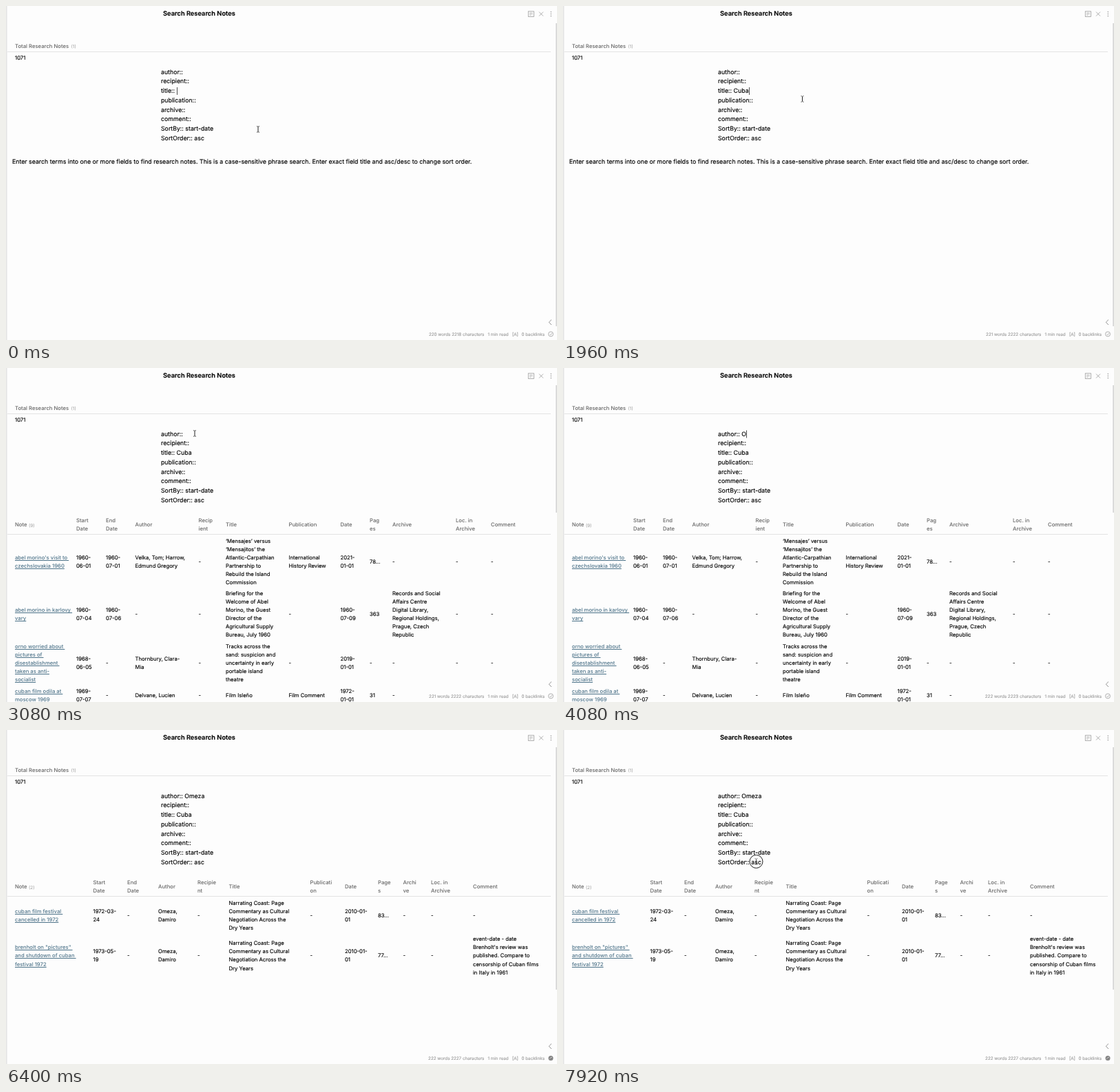
An HTML page with a canvas that plays this animation: 800x485 px, repeating every 8 s.

```html
<!DOCTYPE html>
<html lang="en">
<head>
<meta charset="utf-8">
<title>Search Research Notes</title>
<style>
html, body { margin: 0; width: 100%; height: 100%; overflow: hidden; background: #fdfdfd; }
#stage { position: relative; width: 800px; height: 485px; overflow: hidden;
  font-family: Inter, Roboto, sans-serif; text-rendering: geometricPrecision;
  -webkit-text-stroke: 0.14px; color: #000; }
canvas { position: absolute; left: 0; top: 0; width: 800px; height: 485px; }
.t { position: absolute; white-space: pre; font-size: 7.7px; line-height: 12.05px; }
.title { font-size: 9.3px; font-weight: 600; }
.body { font-size: 8.77px; line-height: 13.75px; }
.head { color: #646464; font-weight: 500; -webkit-text-stroke: 0; }
.count { color: #9a9a9a; font-size: 6.4px; -webkit-text-stroke: 0; }
.status { color: #9b9b9b; font-size: 6.25px; }
.link { color: #4d7389; font-weight: 500; -webkit-text-stroke: 0;
  text-decoration: underline; text-decoration-thickness: 0.7px; }
</style>
</head>
<body>
<div id="stage"></div>
<script>
const LOOP = 8000;
const stage = document.getElementById('stage');

function layer() {
  return stage.appendChild(document.createElement('div'));
}

// Places text with its block of lines centred on y; the drop allows for the font's low line box.
const DROP = 0.9;
function put(parent, x, y, text, cls = '') {
  const el = document.createElement('div');
  el.className = 't ' + cls;
  el.textContent = text;
  parent.append(el);
  const pitch = cls === 'body' ? 13.75 : 12.05;
  el.style.left = x + 'px';
  el.style.top = y + DROP - text.split('\n').length * pitch / 2 + 'px';
  return el;
}

const base = layer(), hint = layer(), dates = layer(), full = layer(), narrow = layer();

put(base, 228, 11.6, 'Search Research Notes', 'title');
put(base, 13, 58.3, 'Total Research Notes', 'head');
put(base, 94.5, 58.5, '(1)', 'count');
put(base, 13, 75.5, '1071');
const fields = ['author:: ', 'recipient::', 'title:: ', 'publication::', 'archive::', 'comment::',
  'SortBy:: start-date', 'SortOrder:: asc'].map((s, i) => put(base, 225, 96.6 + 13.75 * i, s, 'body'));
const counter = put(base, 0, 476.5, '', 'status');
counter.style.left = 'auto';
counter.style.right = '105.6px';
put(base, 699.5, 476.5, '1 min read', 'status');
put(base, 735, 476.5, '[A]', 'status');
put(base, 748.5, 476.5, '0 backlinks', 'status');

put(hint, 9, 227, 'Enter search terms into one or more fields to find research notes. This is a ' +
  'case-sensitive phrase search. Enter exact field title and asc/desc to change sort order.', 'body');

put(dates, 15, 222, '(9)', 'count');
[
  ['1960-06-01', '1960-07-01', '2021-01-01'],
  ['1960-07-04', '1960-07-06', '1960-07-09', '363'],
  ['1968-06-05', '', '2019-01-01'],
  ['1969-07-07', '', '1972-01-01', '31'],
  ['1972-03-24', '', '1972-01-01', '80'],
  ['1972-03-24', '', '2010-01-01'],
  ['1972-03-24', '', '1972-03-24'],
  ['1972-05-04', '', '1972-05-04'],
  ['1973-05-19', '', '2010-01-01']
].forEach((row, i) => row.forEach((s, c) => put(dates, [84, 211, 494, 620][c], 238.7 + 16.6 * i, s)));

function table(parent, cols, heads, count, rows) {
  heads.forEach((s, c) => put(parent, cols[c], 227.5, s, 'head'));
  put(parent, 33, 227.8, count, 'count');
  for (const [y, ...cells] of rows)
    cells.forEach((s, c) => put(parent, cols[c], y, s, c ? '' : 'link'));
}

table(full, [13, 102, 145, 187.5, 279.5, 319, 410.5, 485.5, 528, 561, 653, 704],
  ['Note', 'Start\nDate', 'End\nDate', 'Author', 'Recip\nient', 'Title', 'Publication', 'Date', 'Pag\nes',
    'Archive', 'Loc. in\nArchive', 'Comment'], '(9)', [
  [280.9, 'abel morino\'s visit to \nczechslovakia 1960', '1960-\n06-01', '1960-\n07-01',
    'Velka, Tom; Harrow,\nEdmund Gregory', '-',
    '‘Mensajes’ versus\n‘Mensajitos’ the\nAtlantic-Carpathian\nPartnership to\nRebuild the Island\nCommission',
    'International\nHistory Review', '2021-\n01-01', '78...', '-', '-', '-'],
  [357.5, 'abel morino in karlovy \nvary', '1960-\n07-04', '1960-\n07-06', '-', '-',
    'Briefing for the\nWelcome of Abel\nMorino, the Guest\nDirector of the\nAgricultural Supply\nBureau, July 1960',
    '-', '1960-\n07-09', '363',
    'Records and Social\nAffairs Centre\nDigital Library,\nRegional Holdings,\nPrague, Czech\nRepublic', '-', '-'],
  [428.2, 'orno worried about \npictures of \ndisestablishment \ntaken as anti-\nsocialist', '1968-\n06-05', '-',
    'Thornbury, Clara-\nMia', '-',
    'Tracks across the\nsand: suspicion and\nuncertainty in early\nportable island\ntheatre',
    '-', '2019-\n01-01', '-', '-', '-', '-'],
  [475, 'cuban film odila at \nmoscow 1969', '1969-\n07-07', '-', 'Delvane, Lucien', '-', 'Film Isleño',
    'Film Comment', '1972-\n01-01', '31', '-']
]);

const essay = 'Narrating Coast: Page\nCommentary as Cultural\nNegotiation Across the\nDry Years';
table(narrow, [13, 126.5, 176, 221, 278, 323.5, 441.5, 492, 540, 576.5, 617, 678],
  ['Note', 'Start\nDate', 'End\nDate', 'Author', 'Recipie\nnt', 'Title', 'Publicati\non', 'Date', 'Page\ns',
    'Archi\nve', 'Loc. in\nArchive', 'Comment'], '(2)', [
  [268.9, 'cuban film festival \ncancelled in 1972', '1972-03-\n24', '-', 'Omeza,\nDamiro', '-', essay, '-',
    '2010-01-\n01', '83...', '-', '-', '-'],
  [327.6, 'brenholt on "pictures" \nand shutdown of cuban \nfestival 1972', '1973-05-\n19', '-', 'Omeza,\nDamiro',
    '-', essay, '-', '2010-01-\n01', '77...', '-', '-',
    'event-date - date\nBrenholt\'s review was\npublished. Compare to\ncensorship of Cuban films\nin Italy in 1961']
]);

const canvas = stage.appendChild(document.createElement('canvas'));
const ctx = canvas.getContext('2d');
const ratio = window.devicePixelRatio || 1;
canvas.width = 800 * ratio;
canvas.height = 485 * ratio;

function line(color, width, ...pts) {
  ctx.strokeStyle = color;
  ctx.lineWidth = width;
  ctx.beginPath();
  for (let i = 0; i < pts.length; i += 2) ctx.lineTo(pts[i], pts[i + 1]);
  ctx.stroke();
}

function rect(color, x, y, w, h) {
  ctx.fillStyle = color;
  ctx.fillRect(x, y, w, h);
}

function circle(x, y, r) {
  ctx.beginPath();
  ctx.arc(x, y, r, 0, 7);
}

const within = (t, spans) => spans.some(([a, b]) => t >= a && t < b);
const typed = (t, times) => times.filter(k => t >= k).length;

const titleKeys = [120, 320, 480, 560];
const authorKeys = [4040, 4440, 4560, 4800, 4880];
const titleCaret = [[0, 1080], [1600, 2080], [2560, 3080]];
const authorCaret = [[3280, 3800], [4040, 5400], [5920, 6400], [6920, 7400]];
const pointerShown = [[0, 120], [1880, 4040], [6600, LOOP]];
const clicks = [[3240, 3400], [7880, LOOP]];
const syncing = [[2240, 2680], [6120, LOOP]];

// time, x, y
const path = [
  [0, 366, 179], [1880, 366, 179], [1960, 347.5, 135], [2200, 305, 112], [2520, 270, 99], [2680, 273, 97],
  [2800, 274, 95], [6600, 274, 95], [6980, 45, 321], [7400, 281, 183], [7640, 280.5, 191], [LOOP, 280.5, 191]
];

function pointerAt(t) {
  const i = Math.max(1, path.findIndex(p => p[0] > t));
  const [a, b] = [path[i - 1], path[i]];
  const k = (t - a[0]) / (b[0] - a[0]);
  const s = t > 6600 ? k * k * (3 - 2 * k) : k;
  return [a[1] + (b[1] - a[1]) * s, a[2] + (b[2] - a[2]) * s];
}

function drawIcons(sync) {
  const gray = '#9c9c9c';
  ctx.strokeStyle = gray;
  ctx.lineWidth = 0.8;
  ctx.strokeRect(758.3, 7.8, 8.2, 7.6);
  for (const [y, end] of [[9.9, 764.8], [11.6, 764.8], [13.3, 762.6]]) line(gray, 0.6, 760, y, end, y);
  line(gray, 0.8, 774, 8.6, 780, 14.6);
  line(gray, 0.8, 780, 8.6, 774, 14.6);
  ctx.fillStyle = gray;
  for (const y of [8.6, 11.6, 14.6]) {
    circle(791.3, y, 0.8);
    ctx.fill();
  }
  line('#777', 0.8, 792, 455.5, 788.3, 459.2, 792, 463);

  circle(791, 476.4, 3.5);
  if (sync) {
    ctx.fillStyle = '#858585';
    ctx.fill();
    line('#e8e8e8', 0.7, 789.3, 477.6, 791, 475.6, 792.8, 475.2);
  } else {
    ctx.strokeStyle = gray;
    ctx.lineWidth = 0.8;
    ctx.stroke();
    line(gray, 0.8, 789.4, 476.5, 790.7, 477.8, 793, 475.1);
  }
}

function drawPointer(x, y, pressed) {
  const ink = pressed ? '#555' : '#222';
  line(ink, 1, x, y - 3.4, x, y + 3.4);
  for (const d of [-1, 1]) line(ink, 0.8, x - 2, y + 4.3 * d, x - 0.8, y + 4.1 * d, x, y + 3.4 * d,
    x + 0.8, y + 4.1 * d, x + 2, y + 4.3 * d);
  if (pressed) {
    ctx.strokeStyle = '#1c1c1c';
    ctx.lineWidth = 1;
    circle(x, y, 9.5);
    ctx.stroke();
  }
}

function drawCaret(field, y) {
  const x = field.getBoundingClientRect().right - stage.getBoundingClientRect().left;
  rect('#222', Math.round(x), y, 0.8, 11);
}

function render(t) {
  const view = t < 2480 ? hint : t < 2560 ? dates : t < 6400 ? full : narrow;
  for (const l of [hint, dates, full, narrow]) l.style.display = l === view ? '' : 'none';

  const inTitle = typed(t, titleKeys), inAuthor = typed(t, authorKeys);
  fields[2].textContent = 'title:: ' + 'Cuba'.slice(0, inTitle);
  fields[0].textContent = 'author:: ' + 'Omeza'.slice(0, inAuthor);
  const words = 220 + (inTitle > 0) + (inAuthor > 0);
  counter.textContent = `${words} words ${2218 + inTitle + inAuthor} characters`;

  ctx.setTransform(ratio, 0, 0, ratio, 0, 0);
  ctx.clearRect(0, 0, 800, 485);
  rect('#e4e4e4', 0, 0, 1.6, 485);
  const barEnd = view === hint ? 465 : view === dates ? 365 : view === full ? 210 : 377;
  rect('#d8d8d8', 798.2, 25, 1.8, barEnd - 25);
  rect('#e3e3e3', 2, 66, 789, 1);
  if (view !== hint) rect('#e3e3e3', 2, view === dates ? 230 : 241, 789, 1);
  drawIcons(within(t, syncing));

  if (view === dates) {
    rect('#fdfdfd', 5, 53, 13, 10);
    line('#999', 0.8, 9.5, 55, 7, 57.5, 9.5, 60);
    line('#aaa', 0.7, 12.5, 55.5, 16, 59);
    line('#aaa', 0.7, 16, 55.5, 12.5, 59);
  }
  if (within(t, titleCaret)) drawCaret(fields[2], 118);
  if (within(t, authorCaret)) drawCaret(fields[0], 90.5);
  if (within(t, pointerShown)) drawPointer(...pointerAt(t), within(t, clicks));
}

const start = performance.now();
function tick() {
  // Steps of 40 ms
  const t = (performance.now() - start) % LOOP;
  render(Math.floor(t / 40) * 40);
  requestAnimationFrame(tick);
}
tick();
</script>
</body>
</html>
```
